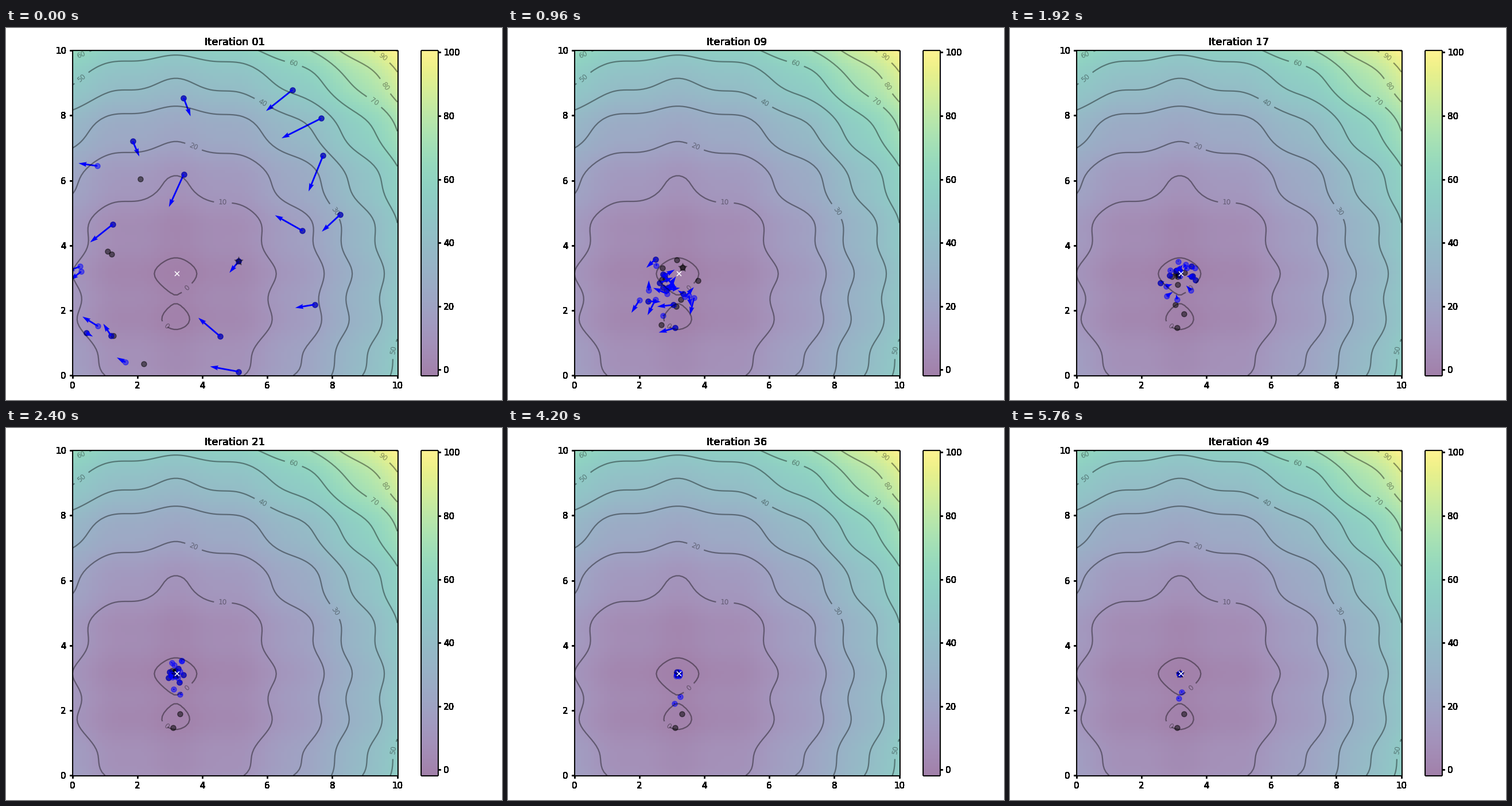
Write a matplotlib script that moves like this. It is 864 by 648 pixels and loops after 5880 ms.

```python
import numpy as np
import matplotlib.pyplot as plt
from matplotlib.animation import FuncAnimation
from matplotlib.patches import Rectangle

WIDTH, HEIGHT, DPI = 864, 648, 108
FRAMES = 49
WARM_UP = 2          # swarm steps already taken when the loop starts
N_PARTICLES = 20
W, C1, C2 = 0.8, 0.1, 0.1

# plot box in pixels, measured from the lower left corner
LEFT, BOTTOM, SIDE = 115.5, 42.7, 566.1
BAR_LEFT = 723.3

LABEL_SPOTS = [
    (3.52, 2.70), (2.905, 1.52), (4.635, 5.335), (3.735, 7.05), (8.11, 5.07),
    (5.85, 8.39), (0.275, 9.165), (9.88, 0.78), (0.275, 9.87), (6.81, 9.61),
    (9.30, 8.44), (9.63, 8.90), (9.56, 9.81),
]


def f(x, y):
    return (x - 3.14)**2 + (y - 2.72)**2 + np.sin(3*x + 1.41) + np.sin(4*y - 1.73)


def run_swarm(steps):
    """Return (positions, velocities, personal bests, global best) per step."""
    rng = np.random.RandomState(100)
    X = rng.rand(2, N_PARTICLES) * 10
    V = rng.randn(2, N_PARTICLES) * 0.5
    pbest, pbest_obj = X.copy(), f(*X)
    history = []
    for _ in range(steps):
        gbest = pbest[:, [pbest_obj.argmin()]]
        r1, r2 = rng.rand(2)
        V = W*V + C1*r1*(pbest - X) + C2*r2*(gbest - X)
        X = X + V
        obj = f(*X)
        pbest = np.where(obj <= pbest_obj, X, pbest)
        pbest_obj = np.minimum(obj, pbest_obj)
        history.append((X, V, pbest, pbest[:, pbest_obj.argmin()]))
    return history


def heavy(artist, times=24):
    """Draw an artist repeatedly so that its soft edges turn solid."""
    draw = artist.draw

    def repeat(renderer):
        for _ in range(times):
            draw(renderer)
    artist.draw = repeat


def framed_axes(left, width):
    """Axes over a solid outer frame; their own patch hides its inner half."""
    box = [left / WIDTH, BOTTOM / HEIGHT, width / WIDTH, SIDE / HEIGHT]
    frame = fig.add_artist(Rectangle(box[:2], *box[2:], fill=False, lw=0.8, zorder=-1))
    heavy(frame)
    return fig.add_axes(box)


states = run_swarm(WARM_UP + FRAMES)[WARM_UP - 1:]

grid = np.linspace(0, 10, 100)
x, y = np.meshgrid(grid, grid)
z = f(x, y)
x_min, y_min = x.ravel()[z.argmin()], y.ravel()[z.argmin()]

fig = plt.figure(figsize=(WIDTH / DPI, HEIGHT / DPI), dpi=DPI, facecolor="white")
ax = framed_axes(LEFT, SIDE)
img = ax.imshow(z, extent=[0, 10, 0, 10], origin="lower", cmap="viridis", alpha=0.5)
bar = fig.colorbar(img, cax=framed_axes(BAR_LEFT, SIDE / 20))
ax.plot([x_min], [y_min], marker="x", markersize=5, color="white")
contours = ax.contour(x, y, z, 10, colors="black", alpha=0.4)
ax.set_xlim(0, 10)
ax.set_ylim(0, 10)
ax.clabel(contours, inline=True, inline_spacing=8, fontsize=8, fmt="%.0f",
          manual=LABEL_SPOTS)

X, V, pbest, gbest = states[0]
pbest_plot = ax.scatter(*pbest, marker="o", color="black", alpha=0.5)
p_plot = ax.scatter(*X, marker="o", color="blue", alpha=0.5)
p_arrow = ax.quiver(*X, *V, color="blue", width=0.005,
                    angles="xy", scale_units="xy", scale=1)
gbest_plot = ax.scatter(*gbest, marker="*", s=100, color="black", alpha=0.4)
ax.set_xlim(0, 10)
ax.set_ylim(0, 10)
title = ax.set_title("Iteration 01")

fig.canvas.draw()
heavy(title)
for axis in (ax.xaxis, ax.yaxis, bar.ax.yaxis):
    for tick in axis.get_major_ticks():
        for part in (tick.label1, tick.label2, tick.tick1line, tick.tick2line):
            heavy(part)


def animate(i):
    X, V, pbest, gbest = states[i]
    title.set_text(f"Iteration {i + 1:02d}")
    pbest_plot.set_offsets(pbest.T)
    p_plot.set_offsets(X.T)
    p_arrow.set_offsets(X.T)
    p_arrow.set_UVC(*V)
    gbest_plot.set_offsets(gbest.reshape(1, 2))


anim = FuncAnimation(fig, animate, frames=FRAMES, interval=120,
                     init_func=lambda: animate(0), blit=False, repeat=True)
plt.show()
```
